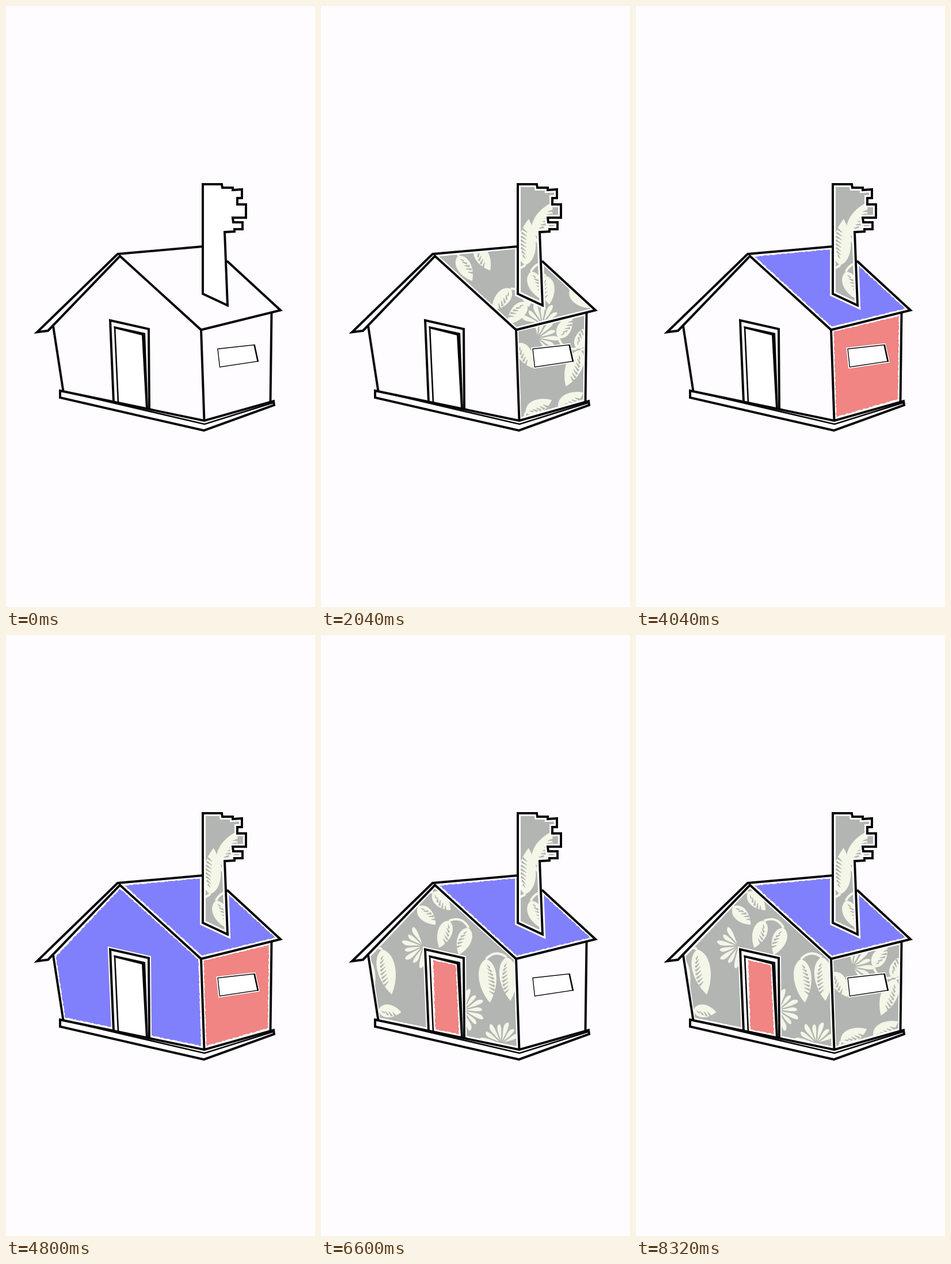
An HTML page for the animation above (8400 ms loop, 537 by 1042 pixels).

```html
<!DOCTYPE html>
<html lang="en">
<head>
<meta charset="utf-8">
<title>House colouring</title>
<style>
html, body { margin: 0; width: 100%; height: 100%; overflow: hidden; background: #fefcfe; }
svg { display: block; width: 100%; height: 100%; }
</style>
</head>
<body>
<svg id="stage" viewBox="0 0 537 1042"></svg>
<script>
const LOOP = 8400;
const GRAY = '#b2b5b1', CREAM = '#f4f6e8', BLUE = '#8180fc', CORAL = '#f08583', INK = '#060608';
const stage = document.getElementById('stage');

function add(parent, tag, attrs) {
  const el = document.createElementNS('http://www.w3.org/2000/svg', tag);
  for (const k in attrs) el.setAttribute(k, attrs[k]);
  parent.appendChild(el);
  return el;
}

const place = (parent, x, y, angle) => add(parent, 'g', { transform: `translate(${x} ${y}) rotate(${angle})` });

// Leaf centred on (0,y) pointing along x, veins on its inner half
function leaf(parent, y, len) {
  const w = 9 + len * .15, side = -Math.sign(y);
  const g = place(parent, -len / 2, y, 0);
  add(g, 'path', {
    fill: CREAM,
    d: `M0 0C${len * .12} ${-w} ${len * .62} ${-w} ${len} 0C${len * .62} ${w} ${len * .12} ${w} 0 0`
  });
  let veins = '';
  for (let t = .14; t < .74; t += 6.5 / len) {
    const x = t * len, h = 2.25 * t * (1 - t) * w * side;
    veins += `M${x} ${side}L${x + 4} ${h}L${x + 6.5} ${h * .85}Z`;
  }
  add(g, 'path', { d: veins, fill: GRAY, stroke: GRAY, 'stroke-width': .9 });
}

// Two parallel leaves whose stalks meet in an arch
function sprig(parent, x, y, angle, len = 50) {
  const g = place(parent, x, y, angle), base = -len / 2;
  add(g, 'path', { d: `M${base} -18Q${base - 16} 0 ${base} 18`, fill: 'none', stroke: CREAM, 'stroke-width': 4 });
  leaf(g, -18, len);
  leaf(g, 18, len);
}

function fan(parent, x, y, angle) {
  for (let i = -3; i <= 3; i++) {
    const size = i % 2 ? 38 : 33;
    add(place(parent, x, y, angle + i * 24), 'path', {
      fill: CREAM,
      transform: `scale(${size})`,
      d: 'M.12 0C.5 -.04 .82 -.26 1 -.03C1.03 .12 .6 .08 .12 0'
    });
  }
}

const regions = {
  roof: {
    shape: 'M196 431L341 417L384 442L477 527L339 561Z',
    motif(g) {
      sprig(g, 266, 446, 60);
      sprig(g, 327, 521, 131);
      sprig(g, 376, 495, 83);
      sprig(g, 463, 494, 40);
      fan(g, 384, 552, -85);
    }
  },
  front: {
    shape: 'M198 434L82 556L99 667L344 718L339 561Z',
    motif(g) {
      sprig(g, 197, 474, 46, 44);
      sprig(g, 231, 525, 110);
      sprig(g, 308, 598, 85, 76);
      sprig(g, 97, 588, 78, 80);
      sprig(g, 118, 670, 5, 40);
      fan(g, 178, 540, 170);
      fan(g, 247, 650, 0);
      fan(g, 313, 708, -95);
    }
  },
  side: {
    shape: 'M339 561L461.5 532L459.5 685L344 718Z',
    motif(g) {
      sprig(g, 440, 565, -60, 46);
      sprig(g, 455, 635, 112, 68);
      sprig(g, 340, 615, 60);
      sprig(g, 386, 710, -25);
      sprig(g, 443, 698, -30);
      fan(g, 376, 575, -20);
    }
  },
  chimney: {
    shape: 'M342 309H375L376 315H394V319L410 318V333H402V344H417V367H394L395 375H411V387H397V391L380 392L385 519L342 499Z',
    gap: 10,
    motif(g) {
      sprig(g, 340, 408, -86, 80);
      sprig(g, 402, 378, -62, 66);
      sprig(g, 390, 478, 70);
    }
  },
  door: { shape: 'M191 559L238 569L244 697L195 687Z', gap: 7 }
};

function buildRegion(name) {
  const r = regions[name], { shape: d, gap = 8 } = r;
  add(add(stage, 'clipPath', { id: name }), 'path', { d });
  r.group = add(stage, 'g', {});
  const inner = add(r.group, 'g', { 'clip-path': `url(#${name})` });
  r.paint = add(inner, 'path', { d });
  r.leaves = add(inner, 'g', {});
  if (r.motif) r.motif(r.leaves);
  const edge = { d, fill: 'none', stroke: '#fff' };
  add(r.group, 'path', { ...edge, 'stroke-width': gap });
  r.rough = add(r.group, 'path', { ...edge, 'stroke-width': gap + 1.6, 'stroke-dasharray': '5 4 9 3 3 7' });
}

const blank = (d, w) => add(stage, 'path', { d, fill: '#fff', stroke: '#fff', 'stroke-width': w });
const line = (d, w = 4) => add(stage, 'path', { d, fill: 'none', stroke: INK, 'stroke-width': w, 'stroke-miterlimit': 8 });

function buildHouse() {
  const frame = 'M187 687L181 545L248 560L249 699';
  const pane = 'M368 594.5L431.5 587.5L438 616L371.5 626Z';
  const plinth = 'M94 667V679L344 736L466 692L465 685L344.5 719Z';

  ['roof', 'front', 'side'].forEach(buildRegion);
  blank(regions.chimney.shape, 9);
  buildRegion('chimney');
  blank(frame, 8);
  buildRegion('door');
  blank(pane, 5);
  blank(plinth, 1);

  // eave, roof and walls
  line('M341 417L194 430L54 565.5L73 563L198 433.5L339 561.5L477 527.5L384 442');
  line('M82 555L99.5 668M339 561L344.5 719M461.5 532L459.5 687');

  line(plinth);
  line('M100 668L345 725L464 688', 2.6);

  line(frame);
  line('M195 688L189 557', 2.6);
  add(stage, 'path', { d: 'M187 555L242 567L247 699L243 698L236 571L188 559Z', fill: INK });

  line(pane, 1.4);
  line('M431.5 587L438 617', 2.6);

  line(regions.chimney.shape);
}

const events = [
  [120, 'chimney', 'leaf'],
  [1040, 'roof', 'leaf'],
  [1840, 'side', 'leaf'],
  [2760, 'roof', BLUE],
  [3560, 'side', CORAL],
  [4320, 'front', BLUE],
  [5080, 'door', CORAL],
  [6000, 'front', ''],
  [6040, 'front', 'leaf'],
  [6600, 'side', ''],
  [6640, 'side', 'leaf']
];

const show = (el, on) => { el.style.display = on ? '' : 'none'; };

function draw(t) {
  const look = {};
  for (const [at, name, fill] of events) if (t >= at) look[name] = fill;
  for (const name in regions) {
    const r = regions[name], fill = look[name], leafy = fill === 'leaf';
    show(r.group, fill);
    show(r.leaves, leafy);
    show(r.rough, !leafy);
    r.paint.setAttribute('fill', leafy ? GRAY : fill || 'none');
  }
}

buildHouse();
const start = performance.now();
function tick() {
  draw((performance.now() - start) % LOOP);
  requestAnimationFrame(tick);
}
tick();
</script>
</body>
</html>
```
